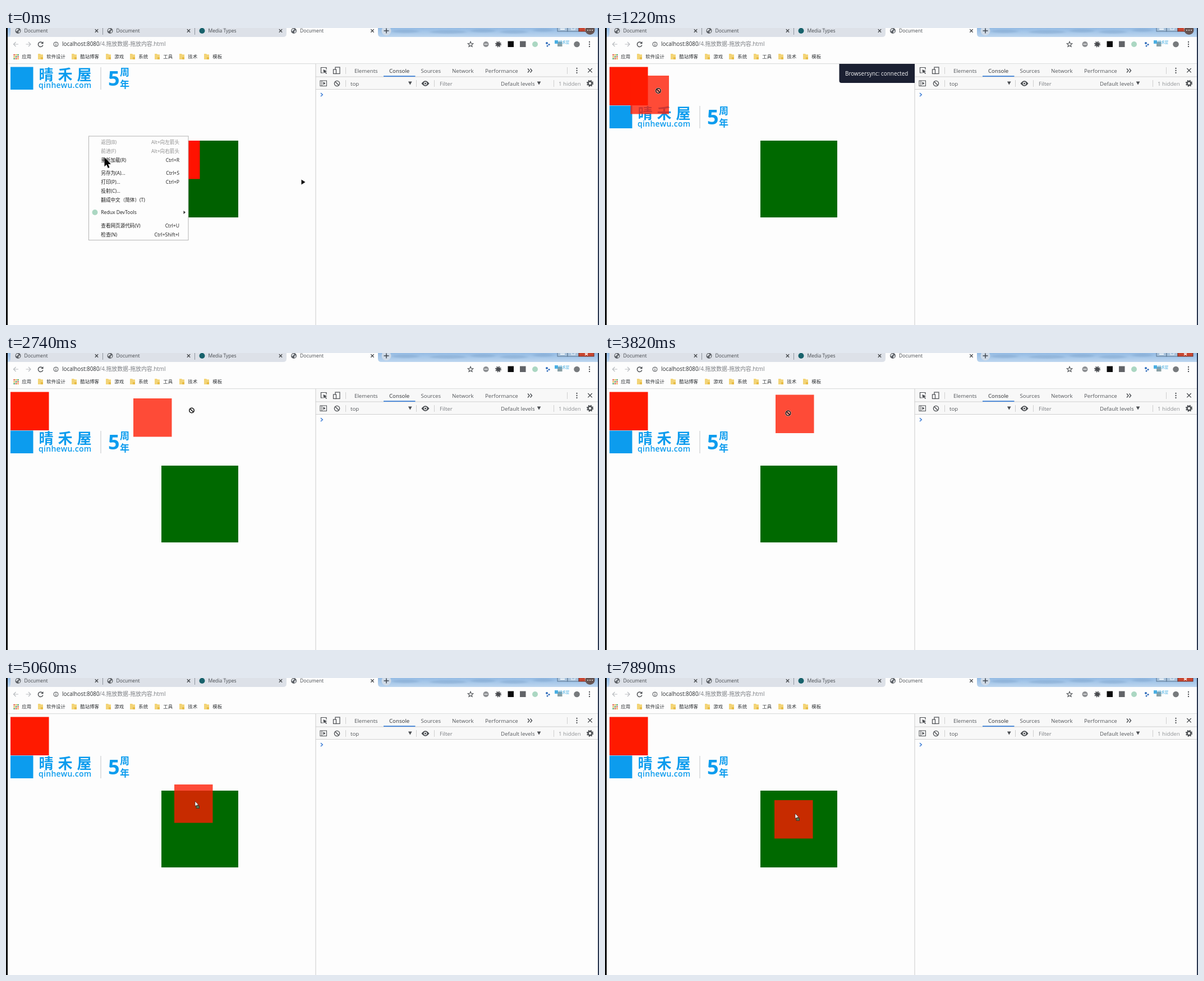
An HTML page that plays this animation: 1057x530 px, repeating every 8 s.

```html
<!DOCTYPE html>
<html lang="zh-CN">
<head>
<meta charset="utf-8">
<title>Document</title>
<style>
html, body { margin: 0; width: 100%; height: 100%; overflow: hidden; background: #fdfdfd; }
svg { display: block; }
text { font-family: "Open Sans", "Noto Sans CJK SC", "Noto Sans CJK", sans-serif; white-space: pre; }
</style>
</head>
<body>
<svg id="stage" width="1057" height="530" viewBox="0 0 1057 530"></svg>
<script>
const LOOP = 8000;
const BLUE = '#0c9cee', INK = '#4a4d51';

const rect = (x, y, w, h, fill, more = '') =>
  `<rect x="${x}" y="${y}" width="${w}" height="${h}" fill="${fill}" ${more}/>`;
const disc = (x, y, r, fill, more = '') =>
  `<circle cx="${x}" cy="${y}" r="${r}" fill="${fill}" ${more}/>`;
const line = (d, color = INK, w = 1.2, more = '') =>
  `<path d="${d}" fill="none" stroke="${color}" stroke-width="${w}" ${more}/>`;
const shape = (d, fill, more = '') => `<path d="${d}" fill="${fill}" ${more}/>`;
const text = (x, y, size, fill, s, more = '') =>
  `<text x="${x}" y="${y}" font-size="${size}" fill="${fill}" ${more}>${s}</text>`;
const group = (id, body) => `<g id="${id}">${body}</g>`;
const cross = (x, y, r) => line(`M${x - r} ${y - r}l${2 * r} ${2 * r}M${x + r} ${y - r}l${-2 * r} ${2 * r}`, '#44474b', 1.3);
const kebab = (x, y) => [-4, 0, 4].map(d => disc(x, y + d, 1.15, INK)).join('');
const downArrow = (x, y) => shape(`M${x - 3.3} ${y - 3}h6.6l-3.3 6z`, INK);

function globe(x) {
  return disc(x, 5, 5, '#5c6066') +
    shape(`M${x - 3} 2l3 -1 1 2 -2 1 -1 2 -2 -1zM${x + 1} 5l3 -1 -1 4 -2 1z`, '#dfe2e6');
}

function titleBar() {
  const streaks = [[712, 6, 24], [788, 7, 32], [850, 5, 22], [905, 7, 24], [958, 4, 18]]
    .map(([x, y, w]) => `<ellipse cx="${x}" cy="${y}" rx="${w}" ry="3" fill="#7299c2" opacity=".35" filter="url(#soft)"/>`).join('');
  const tabs = [[21.5, 'Document', 0], [185.5, 'Document', 0], [349.5, 'Media Types', 1], [513, 'Document', 0]]
    .map(([x, name, plain]) => (plain ? disc(x, 5, 5, '#17616b') : globe(x)) +
      text(x + 11, 8.3, 8.6, '#45494e', name) + cross(x + 140, 5, 2.7)).join('');
  return rect(3, 0, 1052, 16, 'url(#sky)') + streaks +
    shape('M3 16Q8 16 8 10V0H500V16z', '#dde1e8') +
    shape('M494 16Q500 16 500 10V0H663V10Q663 16 669 16z', '#fdfdfd') +
    line('M172.5 0V12M336.5 0V12', '#8d949d', 1) + tabs +
    disc(678, 5, 8.5, '#cfdae7') + line('M673.5 5h9M678 .5v9', '#3f464f', 1.5);
}

function windowButtons() {
  return rect(983, -3, 18, 9, '#a9c3dc', 'stroke="#56738f"') +
    rect(1001, -3, 20, 9, '#a9c3dc', 'stroke="#56738f"') +
    rect(1021, -3, 27, 9, '#c8452f', 'stroke="#6e2c27"') +
    rect(988, 1, 8, 2, '#f5f8fb') + rect(1008, -1, 6, 4, 'none', 'stroke="#f5f8fb"') +
    line('M1032 0l5 4M1037 0l-5 4', '#fff', 1.5);
}

function toolbar() {
  const colors = ['#d9483b', '#e2a72c', '#3d9b54'];
  let apps = '';
  for (let i = 0; i < 9; i++) apps += rect(13.5 + i % 3 * 3.4, 46.8 + (i / 3 | 0) * 3.4, 2.3, 2.3, colors[(i + (i / 3 | 0)) % 3]);
  const marks = [[57, '软件设计'], [117, '酷站博客'], [178, '游戏'], [221, '系统'], [265, '工具'], [309, '技术'], [353, '模板']]
    .map(([x, s]) => shape(`M${x} 46h4l1.3 1.3h3.7v8.7h-9z`, '#f3d477') +
      rect(x + 5, 52, 4, 4, '#e8bd48') + text(x + 15.3, 54.3, 8.4, '#2f3235', s)).join('');
  const star = Array.from({length: 10}, (_, i) => {
    const r = i % 2 ? 2.2 : 5, a = i * Math.PI / 5;
    return `${828 + r * Math.sin(a)},${29.3 - r * Math.cos(a)}`;
  }).join(' ');
  return rect(3, 16, 1052, 47.5, '#fdfdfd') + rect(3, 63.2, 1052, 1, '#d5d6d8') +
    line('M22 29h-8.5m4 -4l-4 4 4 4M35.500 29h8.500m-4 -4l4 4-4 4', '#b9bcc0') +
    line('M65 26.500A4.300 4.300 0 1 0 65.800 30.500', INK, 1.4) + shape('M66.500 24v4.300h-4.300z', INK) +
    disc(89, 29, 4, 'none', `stroke="${INK}"`) + rect(88.4, 28.5, 1.2, 3, INK) + rect(88.4, 26.5, 1.2, 1.2, INK) +
    text(100, 32.4, 9.9, '#2d3033', 'localhost:8080<tspan fill="#7a7d82">/4.拖放数据-拖放内容.html</tspan>') +
    `<polygon points="${star}" fill="none" stroke="${INK}" stroke-width="1.1"/>` +
    disc(855.5, 29, 5, '#8d8f92') + rect(852.5, 28, 6, 1.8, '#d9dadb') +
    disc(877.5, 29, 3.8, '#4a4c50') + disc(877.5, 29, 4.6, 'none', 'stroke="#4a4c50" stroke-width="1.8" stroke-dasharray="1.8 1.8"') +
    rect(894.5, 23.5, 10.5, 10.5, '#0c0c0d') + rect(916, 23.5, 10.5, 10.5, '#626468') +
    disc(943, 29, 5, '#abd7c2') +
    disc(964, 27, 2, '#356fbd') + disc(968, 29.5, 1.6, '#356fbd') + disc(965, 32, 1.5, '#356fbd') +
    rect(983, 24.5, 8.5, 8.5, '#8aa0a5') +
    rect(978, 22, 6, 6, '#49afe3') + text(985, 27.6, 6.4, '#49afe3', '晴禾屋') +
    disc(1017.5, 29, 5.3, '#777a7d') + kebab(1040, 29) +
    apps + text(28.3, 54.3, 8.4, '#2f3235', '应用') + marks;
}

function devTools() {
  const label = (x, y, s, c = '#54575b') => text(x, y + 3.5, 9.7, c, s);
  const bar = (x, y) => rect(x, y - 6, 1, 12, '#cfcfcf');
  const heads = [[621, 'Elements'], [683, 'Console'], [739.5, 'Sources'], [795, 'Network'], [854, 'Performance']]
    .map(([x, s]) => label(x, 76, s, s === 'Console' ? '#2c2e31' : undefined)).join('');
  return rect(552, 64, 503, 45, '#f8f8f8') + rect(551.5, 64, 1, 466, '#cbcbcb') +
    rect(552, 86.5, 503, 1, '#d0d0d0') + rect(552, 109, 503, 1, '#d0d0d0') +
    rect(673, 85.2, 56.5, 1.8, '#4384d8') + heads +
    line('M571 74v-3.500h-9.500v9.500h3.500', INK) + shape('M565.500 74l7 3-3 1 2.500 3-1.200 1-2.500-3-2 2z', INK) +
    rect(587, 70, 8, 11.5, 'none', `stroke="${INK}" stroke-width="1.2"`) + rect(583.5, 74, 5, 7.5, '#f8f8f8', `stroke="${INK}" stroke-width="1.2"`) +
    bar(605, 76) + line('M930 72.500l3 3.500-3 3.500M934.500 72.500l3 3.500-3 3.500', INK, 1.4) +
    bar(1000, 76) + kebab(1017.5, 76) + cross(1041, 75.7, 3.7) +
    rect(560, 94, 11.5, 9.5, 'none', `stroke="${INK}"`) + line('M563 94v9.500', INK, 1) + shape('M565.500 96l4 2.800-4 2.800z', INK) +
    disc(590, 99, 4.6, 'none', `stroke="${INK}" stroke-width="1.4"`) + line('M586.800 95.800l6.400 6.400', INK, 1.4) +
    bar(605, 99) + label(614, 99, 'top') + downArrow(720.3, 98.5) + bar(731, 99) +
    shape('M740.500 99Q747.500 89.500 754.500 99Q747.500 108.500 740.500 99z', INK) + disc(747.5, 99, 2.9, '#f8f8f8') + disc(747.5, 99, 1.6, INK) +
    bar(763, 99) + label(773, 99, 'Filter', '#777a7e') + label(882, 99, 'Default levels') + downArrow(950, 98.5) +
    bar(976, 99) + label(985, 99, '1 hidden', '#929497') +
    disc(1041, 98.7, 3.5, 'none', `stroke="${INK}" stroke-width="2.4"`) +
    disc(1041, 98.7, 5.2, 'none', `stroke="${INK}" stroke-width="1.8" stroke-dasharray="2.1 2"`) +
    line('M561 116l3.300 3-3.300 3', '#3a7bd5', 1.5);
}

function logo() {
  return rect(8, 69.5, 40.5, 40.5, BLUE) +
    text(58.5, 92.5, 26, BLUE, '晴禾屋', 'font-weight="700" letter-spacing="8"') +
    text(58, 107, 14, BLUE, 'qinhewu.com', 'font-weight="600" letter-spacing=".3"') +
    rect(168.5, 70, 1, 40, '#c3c6c9') +
    text(182, 103, 36, BLUE, '5', 'font-weight="700"') +
    text(203, 85, 17, BLUE, '周', 'font-weight="700"') + text(203, 106.500, 17, BLUE, '年', 'font-weight="700"');
}

function menu() {
  const rows = [[203.5, '返回(B)', 'Alt+向左箭头'], [219.5, '前进(F)', 'Alt+向右箭头'], [235.5, '重新加载(R)', 'Ctrl+R'],
    [258.5, '另存为(A)...', 'Ctrl+S'], [274.5, '打印(P)...', 'Ctrl+P'], [290.5, '投射(C)...', ''],
    [306.5, '翻成中文（简体）(T)', ''], [329, 'Redux DevTools', ''], [352.5, '查看网页源代码(V)', 'Ctrl+U'], [368.5, '检查(N)', 'Ctrl+Shift+I']];
  return rect(147.5, 193, 177.5, 185.5, '#fdfdfd', 'stroke="#b4b4b4"') +
    rows.map(([y, name, key], i) => {
      const c = i < 2 ? '#8b8b8b' : '#1c1c1c';
      return text(169.3, y + 3.1, 8.6, c, name) + text(309, y + 3.1, 8.6, c, key, 'text-anchor="end"');
    }).join('') +
    disc(158.5, 329, 5, '#abd7c2') + shape('M316.500 326l3.500 3-3.500 3z', '#333') +
    shape('M526.500 270.500l7 4.500-7 4.500z', '#111');
}

const ARROW = 'M0 0V10.500l2.400-2.200 1.700 3.900 1.700-.800-1.600-3.700h3.200z';

document.getElementById('stage').innerHTML =
  `<defs><linearGradient id="sky" x2="0" y2="1"><stop stop-color="#94bbe4"/><stop offset="1" stop-color="#bdd6ef"/></linearGradient>
  <filter id="soft"><feGaussianBlur stdDeviation="3 1"/></filter></defs>` +
  rect(0, 0, 1057, 530, '#fdfdfd') + titleBar() + windowButtons() +
  group('badge', disc(1041, 3.5, 8.5, '#655452') + line('M1036 4h2m2 0h2m2 0h2', '#e7dfdc', 1.6)) +
  toolbar() + group('logo', logo()) +
  rect(277, 201, 137, 137, '#006900', 'id="target"') + rect(0, 0, 68.5, 68.5, '#ff1a00', 'id="box"') +
  devTools() +
  group('toast', shape('M417.500 64H552V98H421.500Q417.500 98 417.500 94z', '#1b2032') + text(428, 85, 9.95, '#f7f7f8', 'Browsersync: connected')) +
  rect(0, 0, 68.5, 68.5, '#ff1a00', 'id="ghost" opacity=".78"') +
  group('menu', menu()) +
  group('pointer', shape(ARROW, '#050505', 'transform="translate(175.500 231) scale(1.550)"')) +
  group('stop', disc(0, 0, 4.2, '#ffffff', 'fill-opacity=".3" stroke="#fff" stroke-opacity=".5" stroke-width="3"') +
    disc(0, 0, 4.2, 'none', 'stroke="#161616" stroke-width="1.6"') + line('M-3 -3l6 6', '#161616', 1.6)) +
  group('drop', shape(ARROW, '#fff', 'stroke="#222" stroke-width=".7" transform="scale(.85)"') +
    rect(2, 8, 5.500, 4.500, '#5d7550', 'stroke="#222" stroke-width=".9" stroke-dasharray="1.500 .7"')) +
  group('stray', shape(ARROW, '#fff', 'stroke="#555" stroke-width=".8" transform="translate(869.500 420) scale(.9)"')) +
  rect(0, 0, 3, 530, '#050505') + rect(1055, 0, 2, 530, '#27344d');

const el = id => document.getElementById(id);
const show = (id, on) => el(id).setAttribute('display', on ? 'inline' : 'none');
const place = (id, x, y) => el(id).setAttribute('transform', `translate(${x} ${y})`);

// start time, dragged box x y, cursor x y
const DRAG = [
  [1220, 45.5, 85, 95, 112], [1720, 160, 100, 202, 129], [2200, 240, 98, 284, 126], [2390, 293, 86.5, 330, 117],
  [2740, 227, 81, 331, 102.5], [3130, 316, 64, 358, 83], [3640, 316, 64, 325, 99],
  [3820, 304, 74.5, 326.500, 107.5], [3940, 300, 82, 330, 113], [4150, 298, 90, 334, 120], [4420, 297, 93, 334, 123],
  [4650, 297, 97.5, 334, 128], [4930, 299, 135, 336, 165], [5060, 300, 190, 337, 220],
  [5290, 301.5, 217.5, 338.5, 241.5], [7890, 302, 218, 339, 242]
];

function draw(t) {
  const first = t < 510, fresh = t >= 1220, within = (a, b) => t >= a && t < b;
  show('menu', first);
  show('pointer', !fresh);
  show('toast', within(1220, 2200));
  show('badge', t < 2200 || within(4930, 7440));
  show('stray', within(5750, 6250));
  place('logo', 0, fresh ? 69 : 0);
  place('box', fresh ? 8 : 277, fresh ? 69.5 : 201);
  el('target').setAttribute('fill', first ? '#006100' : '#006900');
  el('box').setAttribute('fill', first ? '#ff1200' : '#ff1a00');

  const step = DRAG.filter(s => s[0] <= t).pop();
  const over = t >= 5060;
  show('ghost', !!step);
  show('stop', !!step && !over);
  show('drop', over);
  if (step) {
    place('ghost', step[1], step[2]);
    place(over ? 'drop' : 'stop', step[3], step[4]);
  }
}

const start = performance.now();
function tick() {
  draw((performance.now() - start) % LOOP);
  requestAnimationFrame(tick);
}
tick();
</script>
</body>
</html>
```
